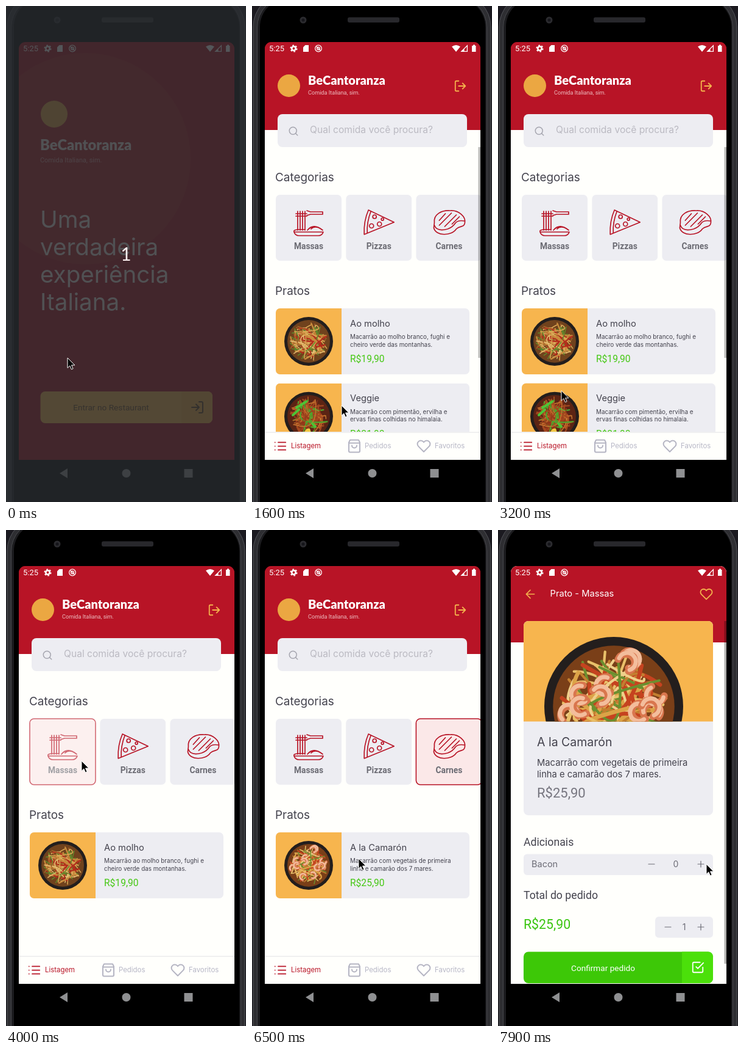
Animation of 394x812 px, one loop 8 s. Source, as an HTML page:

```html
<!DOCTYPE html>
<html lang="pt-BR">
<head>
<meta charset="utf-8">
<title>App de restaurante</title>
<style>
  /* Every animation is paused and positioned by --t (ms), offset by its own --at. */
  * {
    animation: 8s linear calc((var(--at, 0) - var(--t, 0)) * 1ms) both paused;
  }
  html, body { margin: 0; width: 100%; height: 100%; overflow: hidden; background: #1b1a20; }
  svg { display: block; position: absolute; inset: 0; }
  .display {
    position: absolute; left: 21px; top: 59px; width: 354px; height: 684px;
    overflow: hidden; border-radius: 11px 11px 0 0;
  }
  .screen { position: absolute; inset: 0; overflow: hidden; }

  text { font-family: Inter, sans-serif; white-space: pre; }
  .rb { font-family: Roboto, sans-serif; }
  .brand { font: 900 20px Lato, sans-serif; fill: #fff; }
  .mid { text-anchor: middle; }
  .icon { fill: none; stroke-width: 2; stroke-linecap: round; stroke-linejoin: round; }
  .art { fill: none; stroke: #b81426; stroke-width: 1.7; stroke-linecap: round; stroke-linejoin: round; }

  /* Screen changes */
  .reveal, .rise, .exit, .shade {
    animation-duration: .425s;
    animation-timing-function: cubic-bezier(.20833, .82, .25, 1);
  }
  .reveal { animation-name: reveal; }
  .rise { animation-name: rise; }
  .exit { animation-name: exit; }
  .shade { animation-name: shade; }
  @keyframes reveal { from { clip-path: inset(100% 0 0 0); } to { clip-path: inset(0 0 0 0); } }
  @keyframes rise { from { transform: translateY(27px); } to { transform: none; } }
  @keyframes exit { from { transform: none; } to { transform: translateY(-15px); } }
  @keyframes shade { from { opacity: 0; } to { opacity: .1; } }

  /* Visible from --at for the time --for */
  .show {
    visibility: hidden; animation-name: show;
    animation-duration: var(--for); animation-fill-mode: none;
  }
  @keyframes show { from, to { visibility: visible; } }

  .press { animation-name: press; animation-duration: .5s; }
  @keyframes press { 25% { opacity: .5; } 50% { opacity: .64; } 0%, 100% { opacity: 1; } }

  .scroll, .bar, .cursor, .countdown { --at: 0; }
  .scroll { animation-name: scroll; }
  @keyframes scroll {
    0%, 27.5%, 38.75%, 100% { transform: none; }
    32.5%, 33.75% { transform: translateY(-151.5px); }
  }
  .bar { animation-name: bar; }
  @keyframes bar {
    0%, 27.5%, 38.75% { transform: none; opacity: 1; }
    32.5%, 33.75% { transform: translateY(112.5px); opacity: 1; }
    45% { transform: none; opacity: 1; }
    48.75%, 100% { transform: none; opacity: 0; }
  }

  .countdown { animation-name: countdown; }
  @keyframes countdown { 0% { opacity: 1; } 3.75%, 100% { opacity: 0; } }

  .cursor { animation-name: cursor; }
  @keyframes cursor {
    0%, 1.25% { transform: translate(101px, 576px); }
    3.75%, 5% { transform: translate(129px, 605px); }
    7.5% { transform: translate(187px, 640px); }
    8.75%, 22.5% { transform: translate(147px, 654px); }
    25% { transform: translate(78px, 700px); }
    26.25%, 27.5% { transform: translate(86px, 707px); }
    32.5%, 33.75% { transform: translate(96px, 549px); }
    38.75% { transform: translate(100px, 680px); }
    46.25%, 51.25% { transform: translate(124px, 378px); }
    56.25%, 58.75% { transform: translate(218px, 372px); }
    61.25%, 62.5% { transform: translate(239px, 376px); }
    67.5%, 77.5% { transform: translate(309px, 378px); }
    81.25%, 87.5% { transform: translate(175px, 538px); }
    96.25%, 97.5% { transform: translate(337px, 545px); }
    98.75%, 100% { transform: translate(342px, 547px); }
  }
</style>
</head>
<body>

<!-- Phone body -->
<svg width="394" height="812">
  <defs>
    <symbol id="login" viewBox="0 0 24 24"><path d="M15 3h4a2 2 0 0 1 2 2v14a2 2 0 0 1-2 2h-4M10 17l5-5-5-5M15 12H3"/></symbol>
    <symbol id="logout" viewBox="0 0 24 24"><path d="M9 21H5a2 2 0 0 1-2-2V5a2 2 0 0 1 2-2h4M16 17l5-5-5-5M21 12H9"/></symbol>
    <symbol id="search" viewBox="0 0 24 24"><circle cx="11" cy="11" r="8"/><path d="M21 21l-4.3-4.3"/></symbol>
    <symbol id="list" viewBox="0 0 24 24"><path d="M8 5h14M8 12h14M8 19h14M2 5h.01M2 12h.01M2 19h.01"/></symbol>
    <symbol id="bag" viewBox="0 0 24 24"><path d="M5 2h14l2 4v14a2 2 0 0 1-2 2H5a2 2 0 0 1-2-2V6zM3 7h18M16 11a4 4 0 0 1-8 0"/></symbol>
    <symbol id="heart" viewBox="0 0 24 24"><path d="M20.8 4.6a5.5 5.5 0 0 0-7.8 0L12 5.7l-1-1.1a5.5 5.5 0 0 0-7.8 7.8L12 21.2l8.8-8.8a5.5 5.5 0 0 0 0-7.8z"/></symbol>
    <symbol id="back" viewBox="0 0 24 24"><path d="M20 12H4M12 20l-8-8 8-8"/></symbol>
    <symbol id="check" viewBox="0 0 24 24"><path d="M9 11l3 3L22 4M21 12v7a2 2 0 0 1-2 2H5a2 2 0 0 1-2-2V5a2 2 0 0 1 2-2h11"/></symbol>
    <clipPath id="photo"><path d="M42 313.5V157a8 8 0 0 1 8-8h295a8 8 0 0 1 8 8v156.500z"/></clipPath>
    <clipPath id="list-area"><rect x="21" y="231" width="354" height="467"/></clipPath>
  </defs>
  <rect x="2" y="-20" width="390" height="900" rx="54" fill="#2e2e32" stroke="#515257"/>
  <rect x="8.500" y="-15" width="377" height="890" rx="50" fill="#1c1c1f" stroke="#48494d"/>
  <rect x="13" y="-12" width="370" height="890" rx="46"/>
  <circle cx="84" cy="23" r="5.500" fill="#2b2b2f"/>
  <circle cx="84" cy="23" r="2.500" fill="#15151a"/>
  <rect x="157" y="18.500" width="85" height="8.500" rx="3" fill="#28282c"/>
  <g fill="#8f9092">
    <path d="M88 765l13-8v16z"/>
    <circle cx="197.500" cy="765" r="7"/>
    <rect x="292.500" y="758" width="14" height="14"/>
  </g>
</svg>

<div class="display">
  <!-- Welcome -->
  <div class="screen">
    <svg width="354" height="684" viewBox="21 59 354 684">
      <g class="exit" style="--at:1163">
        <rect x="21" y="59" width="354" height="700" fill="#ac111f"/>
        <circle cx="130" cy="250" r="173" fill="#b02027"/>
        <circle cx="79" cy="177" r="22" fill="#eba742"/>
        <text x="56" y="236" class="brand" style="font-size:23.7px;fill:#f0e4e0">BeCantoranza</text>
        <text x="56" y="256" class="rb" font-size="10.9" fill="#e0a2a4">Comida Italiana, sim.</text>
        <g font-size="38.600" fill="#f0e4e0">
          <text x="56" y="363">Uma</text>
          <text x="56" y="408">verdadeira</text>
          <text x="56" y="453">experiência</text>
          <text x="56" y="498">Italiana.</text>
        </g>
        <rect x="56.500" y="631" width="282.500" height="52" rx="8" fill="#ffb84d"/>
        <path d="M288 631h43a8 8 0 0 1 8 8v36a8 8 0 0 1-8 8h-43z" fill="#f9b043"/>
        <text x="172.500" y="662" class="rb mid" font-size="13.700" fill="#6b4a28">Entrar no Restaurant</text>
        <use href="#login" class="icon" x="302" y="645" width="24" height="24" stroke="#5f4326"/>
        <rect class="show" style="--at:1000;--for:.2s" x="56.500" y="631" width="282.500" height="52" rx="8" opacity=".12"/>
        <rect class="shade" x="21" y="59" width="354" height="700"/>
      </g>
    </svg>
  </div>

  <!-- Dish list -->
  <div class="screen reveal" style="--at:1163">
    <svg class="rise" width="354" height="684" viewBox="21 59 354 684">
      <g class="exit" style="--at:7063">
        <rect x="21" y="59" width="354" height="710" fill="#fffffc"/>
        <rect x="21" y="59" width="354" height="144" fill="#b81426"/>
        <circle cx="60.500" cy="130.500" r="18.500" fill="#eba742"/>
        <text x="92" y="129" class="brand">BeCantoranza</text>
        <text x="92" y="145" class="rb" font-size="9.150" fill="#eebfc2">Comida Italiana, sim.</text>
        <use href="#logout" class="icon" x="331" y="120" width="22" height="22" stroke="#f3b24c"/>
        <rect x="42" y="177" width="311" height="54" rx="8" fill="#ededf2"/>
        <use href="#search" class="icon" x="59" y="196" width="18" height="18" stroke="#a6a6af"/>
        <text x="95" y="207.500" font-size="15.600" fill="#bbbac2">Qual comida você procura?</text>
        <g clip-path="url(#list-area)">
          <g class="scroll">
            <g font-size="18.900" fill="#43424d">
              <text x="38" y="287">Categorias</text>
              <text x="38" y="473">Pratos</text>
            </g>
            <g class="show" style="--at:1400;--for:7s" id="content"></g>
          </g>
          <rect class="bar" x="371.500" y="231" width="3.500" height="345" fill="#000" fill-opacity=".27"/>
        </g>
        <rect x="21" y="697.500" width="354" height="60" fill="#fffffc"/>
        <path d="M21 698h354" stroke="#f0f0f0" stroke-width="2"/>
        <g class="icon" stroke="#b5b5c3">
          <use href="#list" x="36" y="710" width="21" height="21" stroke="#b81426"/>
          <use href="#bag" x="156" y="708.500" width="24" height="24"/>
          <use href="#heart" x="270" y="708.500" width="24" height="24"/>
        </g>
        <g font-size="11.400" fill="#b7b7c6">
          <text x="64" y="724" fill="#b81426">Listagem</text>
          <text x="185" y="724">Pedidos</text>
          <text x="300" y="724">Favoritos</text>
        </g>
        <rect class="shade" x="21" y="59" width="354" height="710"/>
      </g>
    </svg>
  </div>

  <!-- Dish details -->
  <div class="screen reveal" style="--at:7063">
    <svg class="rise" width="354" height="684" viewBox="21 59 354 684">
      <rect x="21" y="59" width="354" height="700" fill="#fffffc"/>
      <rect x="21" y="59" width="354" height="125" fill="#b81426"/>
      <g class="icon" stroke="#f3b24c">
        <use href="#back" x="43" y="95" width="20" height="20"/>
        <use href="#heart" x="331" y="94" width="22" height="22"/>
      </g>
      <text x="85.500" y="109" font-size="14.700" fill="#fff">Prato - Massas</text>
      <rect x="42" y="149" width="311" height="318" rx="8" fill="#ededf2"/>
      <g clip-path="url(#photo)">
        <rect x="42" y="149" width="311" height="165" fill="#f7b54e"/>
        <g class="show" style="--at:7500;--for:1s" id="photo-dish"></g>
      </g>
      <g class="show" style="--at:7400;--for:1s">
        <text x="64" y="354" font-size="19.500" fill="#43424d">A la Camarón</text>
        <g font-size="14.750" fill="#43424d">
          <text x="64" y="386">Macarrão com vegetais de primeira</text>
          <text x="64" y="405">linha e camarão dos 7 mares.</text>
        </g>
        <text x="64" y="438" class="rb" font-size="22" fill="#76757f">R$25,90</text>
        <rect x="42" y="530.500" width="311" height="34.500" rx="6" fill="#ededf2"/>
        <text x="55" y="551.500" font-size="14.500" fill="#6c6c76">Bacon</text>
        <text x="292" y="552" class="mid" font-size="14" fill="#6c6c76">0</text>
        <path class="icon" d="M247 547h10M328 547h10m-5-5v10" stroke="#6c6c76" style="stroke-width:1.2"/>
      </g>
      <g font-size="17.700" fill="#43424d">
        <text x="42" y="517" class="rb">Adicionais</text>
        <text x="42" y="604" class="rb">Total do pedido</text>
      </g>
      <text x="42" y="653" class="rb" font-size="21.300" fill="#39c50f">R$25,90</text>
      <rect x="258" y="633" width="95" height="34.500" rx="6" fill="#ededf2"/>
      <text x="305.500" y="654.500" class="mid" font-size="14" fill="#6c6c76">1</text>
      <path class="icon" d="M274 650h10M328 650h10m-5-5v10" stroke="#6c6c76" style="stroke-width:1.2"/>
      <rect x="42" y="690.500" width="311" height="51.500" rx="8" fill="#3dc807"/>
      <path d="M302 690.500h43a8 8 0 0 1 8 8V734a8 8 0 0 1-8 8h-43z" fill="#4be00a"/>
      <text x="172.500" y="722" class="rb mid" font-size="13.600" fill="#fff">Confirmar pedido</text>
      <use href="#check" class="icon" x="317" y="705" width="22" height="22" stroke="#fff"/>
      <rect x="371.500" y="149" width="3.500" height="561" fill-opacity=".3"/>
    </svg>
  </div>
</div>

<!-- Status bar, countdown and pointer -->
<svg width="394" height="812">
  <g fill="#fff">
    <text x="28" y="74" class="rb" font-size="13">5:25</text>
    <circle cx="68.500" cy="69.500" r="3.200" fill="none" stroke="#fff" stroke-width="2.600"/>
    <circle cx="68.500" cy="69.500" r="5.200" fill="none" stroke="#fff" stroke-width="1.800" stroke-dasharray="2.700"/>
    <path d="M87.500 64H93v11h-9v-7.500z"/>
    <g fill="none" stroke="#fff" stroke-width="1.300">
      <circle cx="109" cy="69.500" r="5.300"/><circle cx="109" cy="69.500" r="2.300"/>
      <path d="M106 66.500l6 6M343.800 74.400h9.600v-9.600z"/>
    </g>
    <path d="M328 66.500q7-5 14 0l-7 8.500zM348.500 70v5h-5zM361 65h2v-1.500h3V65h1.500v10H361z"/>
  </g>
  <g class="countdown">
    <rect width="394" height="812" fill="#292c30" opacity=".8"/>
    <text x="197" y="417" class="mid" fill="#fbeeee" style="font:30px Lato,sans-serif">1</text>
  </g>
  <path class="cursor" d="M0 0v16.500l3.800-3.600 2.600 6 2.700-1.200-2.600-5.700h5.400z" stroke="#fff"/>
</svg>

<script>
  const categories = [
    { name: 'Massas', at: 3750, pick: 3900, time: '1.2s',
      art: '<path d="M36 27v31M40 27v31M44 27v31M48 27v31M33 31h18M33 35h18M51 34l6-2h20v-4H57l-6-2M30 60q-1-2 6-3h12M52 58q10-12 25 0M58 56q4-5 13-2M30 61h48q-2 6-8 6H38q-6 0-8-6z"/>' },
    { name: 'Pizzas', at: 4800, pick: 5100, time: '1.1s',
      art: '<path d="M37 25q-8 18-7 40l49-20zM41 27q-7 18-6 36"/><circle cx="47" cy="36" r="3"/><circle cx="42" cy="51" r="3.5"/><circle cx="55" cy="48" r="3.5"/><circle cx="60" cy="40" r="2"/>' },
    { name: 'Carnes', at: 6000, pick: 6200, time: '1.8s',
      art: '<path d="M30 46C28 32 42 25 56 26c14-1 26 10 24 20-1 8-8 4-14 10-8 12-34 12-37-2zM30 50q4 11 22 6 8-3 12-9t16-4M38 42l10-11M38 50l20-20M47 52l19-19M59 48l12-12"/>' },
  ];
  const dishes = [
    { name: 'Ao molho', text: ['Macarrão ao molho branco, fughi e', 'cheiro verde das montanhas.'], price: '19,90',
      base: '#70421d', tones: ['#c98a3c', '#dba855', '#a9642a', '#b32c1c', '#e3bd72', '#5f8a2c'] },
    { name: 'Veggie', text: ['Macarrão com pimentão, ervilha e', 'ervas finas colhidas no himalaia.'], price: '21,90',
      base: '#5b2414', tones: ['#a3481f', '#bb6127', '#8a3319', '#4fa32c', '#9c3b1b', '#c4752f'] },
    { name: 'A la Camarón', text: ['Macarrão com vegetais de primeira', 'linha e camarão dos 7 mares.'], price: '25,90',
      base: '#7a3f18', tones: ['#dca347', '#e9c06a', '#c27f30', '#c5431f', '#efd08a', '#6b8f2f'], shrimp: 13 },
  ];
  const ROW = 122.7;

  function seeded(seed) {
    return () => (seed = (seed * 16807) % 2147483647) / 2147483647;
  }

  // A bowl of tangled noodles with a radius of 40
  function bowl(i, cx, cy, scale = 1) {
    const { base, tones, shrimp = 0 } = dishes[i];
    const rnd = seeded(4211 * (i + 3));
    const spot = max => {
      const a = rnd() * 2 * Math.PI, r = max * Math.sqrt(rnd());
      return `${(r * Math.cos(a)).toFixed(1)} ${(r * Math.sin(a)).toFixed(1)}`;
    };
    let food = '';
    for (let n = 0; n < 80; n++) {
      food += `<path d="M${spot(32)}Q${spot(34)} ${spot(32)}" stroke="${tones[n % 6]}" stroke-width="${n % 3 ? 1.5 : 2.3}"/>`;
    }
    for (let n = 0; n < shrimp; n++) {
      const turn = Math.round(rnd() * 360);
      food += `<g transform="translate(${spot(29)}) rotate(${turn})">
        <path d="M-5 2A5 5 0 1 1 4 3" stroke="#d9764e" stroke-width="4"/>
        <path d="M-5 1A5 5 0 1 1 4 2" stroke="#f3bd9c" stroke-width="2.4"/></g>`;
    }
    if (i === 1) food += '<path d="M-20-14l16-10M-26-2l10-9M6 12l5 5" stroke="#4cc436" stroke-width="4"/><path d="M-8 30q2-12 10-10l3 10z" fill="#efc843"/>';
    return `<g transform="translate(${cx} ${cy}) scale(${scale})">
      <circle r="40" fill="#231e1d"/><circle r="35" fill="${base}"/>
      <g fill="none" stroke-linecap="round">${food}</g></g>`;
  }

  function categoryCard({ name, at, pick, time, art }, i) {
    const box = 'width="108" height="108" rx="7"';
    return `<g transform="translate(${39 + i * 115.2} 309)"><g class="press" style="--at:${at}">
      <rect ${box} fill="#ededf2"/>
      <rect class="show" style="--at:${pick};--for:${time}" ${box} fill="#fbe8e8" stroke="#b81426" stroke-width="1.6"/>
      <g class="art">${art}</g>
      <text class="rb mid" x="54" y="89" font-size="13.8" font-weight="700" fill="#6c6c74">${name}</text>
    </g></g>`;
  }

  function dishCard(i, row, pressAt = 9000) {
    const { name, text, price } = dishes[i];
    return `<g transform="translate(39 ${495 + row * ROW})"><g class="press" style="--at:${pressAt}">
      <rect width="318" height="108" rx="7" fill="#ededf2"/>
      <path d="M108 0H7a7 7 0 0 0-7 7v94a7 7 0 0 0 7 7h101z" fill="#f7b54e"/>
      ${bowl(i, 54, 54)}
      <g fill="#43424d">
        <text x="122" y="29.500" font-size="14.700">${name}</text>
        <text x="122" y="50" font-size="9.900">${text[0]}</text>
        <text x="122" y="62.700" font-size="9.900">${text[1]}</text>
      </g>
      <text x="122" y="88" class="rb" font-size="15.600" fill="#45c814">R$${price}</text>
    </g></g>`;
  }

  const show = (at, time, body) => `<g class="show" style="--at:${at};--for:${time}">${body}</g>`;

  document.getElementById('content').innerHTML =
    categories.map(categoryCard).join('') +
    show(1400, '2.5s', dishCard(0, 0) + dishCard(1, 1, 2450) + dishCard(2, 2)) +
    categories.map((c, i) => show(c.pick, c.time, dishCard(i, 0, i === 2 ? 6550 : undefined))).join('');
  document.getElementById('photo-dish').innerHTML = bowl(2, 190, 289, 2.85);

  const LOOP = 8000, STEP = 100, start = performance.now();
  function tick() {
    const t = (performance.now() - start) % LOOP;
    document.documentElement.style.setProperty('--t', Math.floor(t / STEP) * STEP);
    requestAnimationFrame(tick);
  }
  tick();
</script>
</body>
</html>
```
